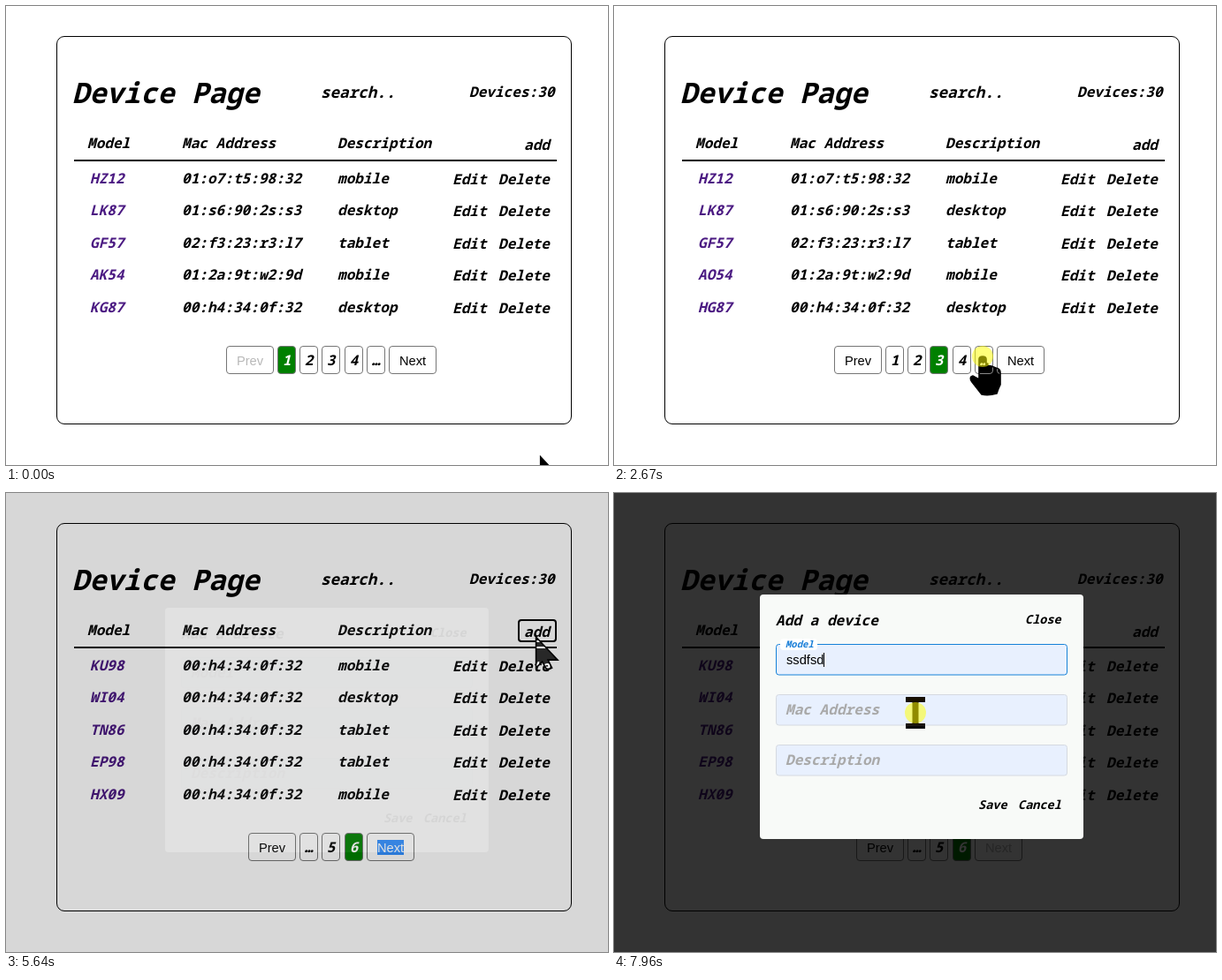
An HTML page that plays this animation: 681x520 px, repeating every 8000 ms.

```html
<!DOCTYPE html>
<html>
<head>
<meta charset="utf-8">
<style>
html, body { margin: 0; width: 100%; height: 100%; overflow: hidden; background: #fff; }
svg { display: block; width: 681px; height: 520px; }
text { font: italic bold 16.1px "Noto Sans Mono", monospace; white-space: pre; }
.ui { font: 14.67px "Liberation Sans", Arial, sans-serif; }
.small { font-size: 13.6px; }
.mid { text-anchor: middle; }
.invert { fill: #fff; mix-blend-mode: difference; }
</style>
</head>
<body>
<svg id="stage" viewBox="0 0 681 520"></svg>
<script>
const LOOP = 8000;
const stage = document.getElementById('stage');

const odd = {
  models: 'HZ12 LK87 GF57 AO54 HG87',
  macs: '01:o7:t5:98:32 01:s6:90:2s:s3 02:f3:23:r3:l7 01:2a:9t:w2:9d 00:h4:34:0f:32',
  kinds: 'mobile desktop tablet mobile desktop'
};
const first = { ...odd, models: 'HZ12 LK87 GF57 AK54 KG87' };
const even = {
  models: 'KU98 WI04 TN86 EP98 HX09',
  macs: '00:h4:34:0f:32 '.repeat(5),
  kinds: 'mobile desktop tablet tablet mobile'
};

// Moments when the next page opens, and when the mouse is pressed
const turns = [1080, 1600, 2700, 2830, 4250];
const presses = [...turns.slice(0, 4), 3600, 4150, 5480, 6500, 7950];
const focusAt = 6470, openAt = 5590;

// Pointer stops: [arrival time, x, y]
const stops = [
  [0, 604, 510], [450, 470, 455], [890, 341, 408], [1550, 368, 403], [2600, 417, 397],
  [3330, 459, 404], [4790, 552, 256], [5200, 599, 162], [5640, 599, 162], [5830, 521, 190],
  [6400, 407, 199], [7570, 404, 238], [7740, 400, 285], [7920, 341, 249]
];

const shapes = {
  arrow: 'M1 1V36L8 29L13.5 38.5L19 36L14.5 27H25.5Z',
  hand: 'M-4 3Q-4 0 0 0Q4 0 4 3V10L10 11L15 13Q20 14 20 18V32Q18 36 16 42Q6 45 -1 43L-12 29Q-16 23 -11 22L-4 26Z',
  beam: 'M-11 -18H11V-12H3.5V12H11V18H-11V12H-3.5V-12H-11Z'
};

const clamp = v => Math.max(0, Math.min(1, v));
const lerp = (a, b, k) => a + (b - a) * k;
const passed = (times, t) => times.filter(x => x <= t).length;
const text = (s, x, y, extra = '') => `<text x="${x}" y="${y}" ${extra}>${s}</text>`;
const rect = (x, y, w, h, r = 0, extra = '') =>
  `<rect x="${x}" y="${y}" width="${w}" height="${h}" rx="${r}" ${extra}/>`;

// Rest at each stop, then move straight to the next within half a second
function pointerAt(t) {
  const i = stops.findIndex(s => s[0] > t);
  if (i < 0) return stops[stops.length - 1].slice(1);
  const [t0, x0, y0] = stops[i - 1], [t1, x1, y1] = stops[i];
  const k = clamp(1 - (t1 - t) / Math.min(500, t1 - t0));
  return [lerp(x0, x1, k), lerp(y0, y1, k)];
}

function pager(page, t) {
  const labels = (page > 4 ? 'Prev … 5 6 Next' : 'Prev 1 2 3 4 … Next').split(' ');
  const gap = 4.2, width = s => s.length > 1 ? 54 : 21;
  const total = labels.reduce((sum, s) => sum + width(s) + gap, -gap);
  let left = 368.4 - total / 2, out = '';
  for (const s of labels) {
    const w = width(s), x = Math.floor(left), on = s === String(page);
    const picked = s === 'Next' && t > 4100 && t < focusAt;
    const off = (s === 'Prev' && page === 1) || (s === 'Next' && t >= focusAt);
    const color = on || picked ? '#fff' : off ? '#b8b8b8' : '#000';
    out += rect(x + .5, 385.5, w - 1, 31, 3.5, `fill="${on ? 'green' : '#fff'}" stroke="#767676"`);
    if (picked) out += rect(x + 12, 393, 30, 17, 0, 'fill="#3390ff"');
    out += text(s, x + w / 2, 407, `class="mid${s.length > 1 ? ' ui' : ''}" fill="${color}"`);
    left += w + gap;
  }
  return out;
}

function rows(data, t) {
  const [models, macs, kinds] = [data.models, data.macs, data.kinds].map(s => s.split(' '));
  return models.map((model, i) => {
    const y = Math.floor(201 + 36.5 * i);
    const hot = i === 2 && t > 4700 && t < 4850;
    return text(model, 95, y, 'fill="#4b1a82"') + text(macs[i], 199, y) + text(kinds[i], 375, y)
      + text('Edit', 505, y + 1, hot ? 'fill="#2aa9a4"' : '') + text('Delete', 557, y + 1);
  }).join('');
}

function devicePage(t) {
  const page = 1 + passed(turns, t);
  let out = rect(57.5, 34.5, 582, 439, 8.5, 'fill="#fff" stroke="#000"')
    + text('Device Page', 75, 110, 'style="font-size:32.1px"')
    + text('search..', 356, 104, 'style="font-size:17.6px"')
    + text('Devices:30', 524, 103)
    + text('Model', 92, 161) + text('Mac Address', 199, 161)
    + text('Description', 375, 161) + text('add', 586, 163)
    + rect(77, 174, 546, 2);
  if (t > 5130 && t < focusAt)
    out += rect(580, 144, 42, 24, 3, 'fill="none" stroke="#000" stroke-width="2"');
  return out + rows(page === 1 ? first : page % 2 ? odd : even, t) + pager(page, t);
}

function field(label, y, focus = 0) {
  const k = clamp(focus);
  let out = rect(183.5, y + .5, 329, 34.5, 3,
    `fill="#e8f0fe" stroke="${k ? '#1681d8' : '#d5d9e0'}"`);
  if (k) out += rect(188, y - 6, 42, 13, 4, `fill="#fff" opacity="${k}"`);
  return out + text(label, 194, lerp(y + 23, y + 4, k),
    `fill="${k ? '#1b7fd8' : '#a9a9a9'}" style="font-size:${lerp(16.1, 10.6, k)}px"`);
}

function entry(t) {
  const word = 'ssdfsd'.slice(0, Math.max(0, Math.ceil((t - 6850) / 190)));
  const caret = [...word].reduce((x, c) => x + (c === 'd' ? 8.2 : c === 'f' ? 4.1 : 7.3), 195);
  return text(word, 195, 194, 'class="ui"') + rect(Math.floor(caret), 181, 1, 16);
}

// The backdrop fades as a group while the card inside fades and slides faster
function dialog(t) {
  const fade = clamp((t - openAt) / 264), k = clamp((t - openAt) / 200);
  if (!fade) return '';
  const shift = 20 * (1 - k);
  return `<g opacity="${fade}">` + rect(0, 0, 681, 520, 0, 'opacity=".8"')
    + `<g opacity="${k}" transform="translate(${shift} ${shift})">`
    + rect(165, 115, 366, 277, 4, 'fill="#f8faf8"')
    + text('Add a device', 183, 150) + text('Close', 465, 148, 'class="small"')
    + field('Model', 171, (t - focusAt) / 150) + field('Mac Address', 228) + field('Description', 285)
    + text('Save', 412, 358, 'class="small"') + text('Cancel', 457, 358, 'class="small"')
    + (t > focusAt ? entry(t) : '') + '</g></g>';
}

function pointer(t) {
  const [x, y] = pointerAt(t);
  const kind = t > 6000 ? 'beam' : t > 850 && t < 4450 ? 'hand' : 'arrow';
  const at = `transform="translate(${x} ${y})" d="${shapes[kind]}"`;
  let out = `<path class="invert" ${at}/>`;
  if (kind !== 'beam') out += `<path ${at} fill="none" stroke="#000" stroke-width="1.6"/>`;
  if (presses.some(p => Math.abs(t - p) < 100))
    out += `<circle cx="${x}" cy="${y}" r="12" fill="#ff0" opacity=".52"/>`;
  return out;
}

function draw() {
  const t = performance.now() % LOOP;
  stage.innerHTML = rect(0, 0, 681, 520, 0, 'fill="#fff"') + devicePage(t) + dialog(t) + pointer(t);
  requestAnimationFrame(draw);
}
draw();
</script>
</body>
</html>
```
